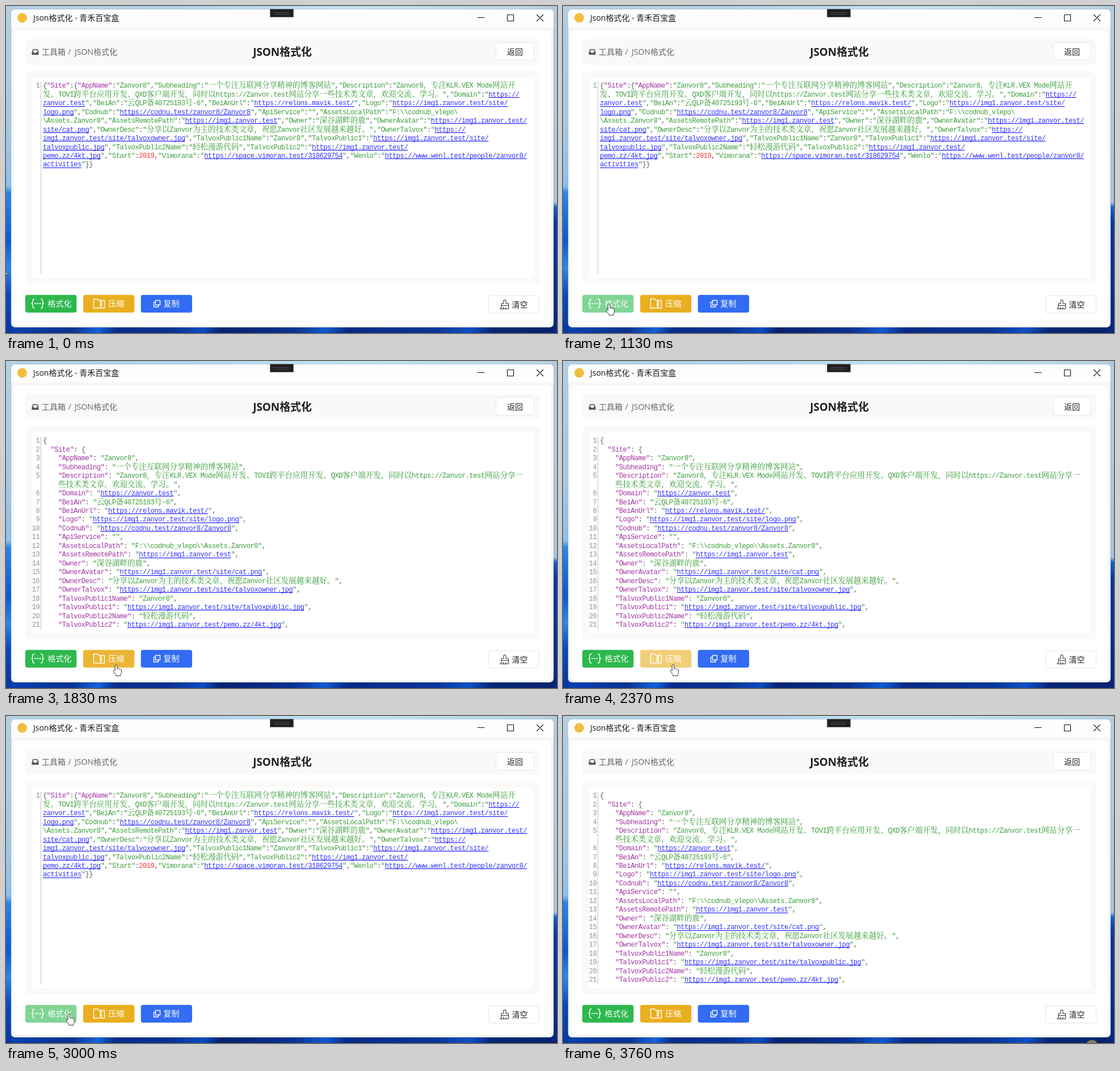
An HTML page that plays this animation: 971 px wide and 577 px high, repeating every 3870 ms.

```html
<!DOCTYPE html>
<html lang="zh-CN">
<head>
<meta charset="utf-8">
<title>Json格式化</title>
<style>
html, body { margin: 0; width: 100%; height: 100%; overflow: hidden; }
body {
  background:
    linear-gradient(#b4cfe2, #a5c8e2 38%, #8cc0ea 55%, #2a86ea 57%, #0d58d2 72%, #2f86ea 80%, #0a49c0 88%, #0a389c) 0 0 / 10px 577px no-repeat,
    linear-gradient(#b3cbdc, #a9c4da 60%, #1560d4 61.5%, #0a37a0 66%, #08267c) 963px 0 / 8px 577px no-repeat,
    linear-gradient(115deg, #0a43b4, #0a3190 12%, #1463da 17%, #092c88 20%, #0a3190 30%, #0c4cc0 36%, #08226e 39%, #0a3190 52%, #1258cf 58%, #092a84 62%, #0a3598 78%, #0f50c4 84%, #082674 88%, #08226e) 0 565px / 971px 12px no-repeat,
    linear-gradient(90deg, #b4cfe2, #b0d3e8 30%, #c2e2f2 62%, #b9d5e6 95%, #b3cbdc);
}
svg { display: block; }
text { white-space: pre; font: 14px 'Open Sans', 'Noto Sans CJK SC', sans-serif; }
.ascii { font: 12.2px 'Liberation Mono', monospace; fill-opacity: .8; }
.wide { font: 300 13.5px 'Noto Serif CJK SC', 'Noto Sans CJK SC', sans-serif; fill-opacity: .85; }
.line { fill: none; stroke-width: 1.4; stroke-linejoin: round; stroke-linecap: round; }
.btn { fill: #fff; }
.btn .line { stroke: #fff; }
</style>
</head>
<body>
<svg width="971" height="577" viewBox="0 0 971 577">
  <clipPath id="view"><rect x="46" y="126" width="883" height="348.5"/></clipPath>

  <!-- window -->
  <rect x="9" y="6" width="956" height="561" rx="7" fill="#f6f7f8" stroke="#7f93a8" stroke-opacity=".4"/>
  <path d="M9 38V13a7 7 0 0 1 7-7H958a7 7 0 0 1 7 7V38Z" fill="#fdfdfd"/>
  <rect x="14" y="43" width="946" height="520" rx="8" fill="#fff"/>
  <circle cx="28.5" cy="21" r="8.5" fill="#f4bd3c"/>
  <text x="48" y="26" fill="#1a1a1a">Json格式化 - 青禾百宝盒</text>
  <path class="line" style="stroke-width:1.1" stroke="#111" d="M831 20.5H843M883.5 15.5H894.5V26.5H883.5ZM935.5 15.5l11 11m0-11l-11 11"/>
  <rect x="465.5" y="5.5" width="41" height="14" fill="#202020" stroke="#6b6b6b"/>
  <path d="M472 11.5H500M472 14.5H500" stroke="#777" stroke-dasharray="1 1"/>

  <!-- header -->
  <rect x="34" y="58" width="906" height="45" rx="6" fill="#f9f9f8"/>
  <path d="M47.5 76H55.5L57.5 81.5V86H45.5V81.5ZM47.5 81.5H49.5L50.5 83H52.5L53.5 81.5H55.5L54.5 77.5H48.5Z" fill="#555" fill-rule="evenodd"/>
  <g fill="#666">
    <text x="63" y="86">工具箱</text><text x="109.5" y="86">/</text><text x="121" y="86">JSON格式化</text>
  </g>
  <text x="487" y="88" text-anchor="middle" fill="#1f1f1f" style="font-size:18.9px;font-weight:700">JSON格式化</text>
  <rect x="863.5" y="64.5" width="67" height="31" rx="4" fill="#fff" stroke="#e6e6e6"/>
  <text x="897" y="86" text-anchor="middle" fill="#212121">返回</text>

  <!-- editor -->
  <rect x="34" y="115" width="906" height="376" rx="8" fill="#f9f9f8"/>
  <rect x="46" y="126" width="883" height="354" fill="#fff"/>
  <path d="M61.5 134V474" stroke="#8a8a8a" stroke-dasharray="1 1"/>
  <g id="flat"></g>
  <g id="tree" clip-path="url(#view)"></g>

  <!-- buttons -->
  <g class="btn">
    <rect x="34" y="509.7" width="90.3" height="31.3" rx="4" fill="#2db84d"/>
    <path class="line" d="M50 517q-3 0-3 3v2.5q0 2.5-2 2.5q2 0 2 2.5v2.5q0 3 3 3M61.5 517q3 0 3 3v2.5q0 2.5 2 2.5q-2 0-2 2.5v2.5q0 3-3 3"/>
    <circle cx="51.5" cy="525" r="1.3"/><circle cx="55.7" cy="525" r="1.3"/><circle cx="60" cy="525" r="1.3"/>
    <text x="73.5" y="530">格式化</text>
  </g>
  <g class="btn">
    <rect x="136" y="509.7" width="90.3" height="31.3" rx="4" fill="#e9af20"/>
    <path class="line" d="M154.5 517H161.5L164 519.5H173.5V533H154.5ZM166 520v2h2.5v2.5H166v2.5h2.5v3H166v-3"/>
    <text x="180.5" y="530">压缩</text>
  </g>
  <g class="btn">
    <rect x="237.7" y="509.7" width="90.3" height="31.3" rx="4" fill="#326cf3"/>
    <path class="line" d="M263.5 519.5H271.5V527.5H263.5ZM263 522.5H260.5V531H268.5V528"/>
    <text x="277.5" y="530">复制</text>
  </g>
  <rect x="850.5" y="511" width="89" height="31" rx="4" fill="#fff" stroke="#e6e6e6"/>
  <path class="line" style="stroke-width:1.1" stroke="#333" d="M877 525V520.5q0-2 2-2t2 2V525H885.5V528.5H873V525ZM873.5 528.5Q873 533 871 534.5H885Q886.5 532 885.5 528.5M876 534.5l1-3M880.5 534.5l.5-3"/>
  <text x="891.5" y="532" fill="#212121">清空</text>

  <circle id="glow" cx="932" cy="582" r="10.5" fill="#e6d43a" fill-opacity=".55"/>
  <g id="cursor" fill="#fff" stroke="#222" stroke-width=".9" stroke-linejoin="round">
    <path id="arrow" d="M0 0V15.5L3.6 12.2 6 17.8 8.4 16.7 6 11.3H11Z"/>
    <path id="hand" d="M-1.8 1.6a1.8 1.8 0 0 1 3.6 0V7l1 .1a1.6 1.6 0 0 1 2.4.6a1.7 1.7 0 0 1 2.4.6a1.6 1.6 0 0 1 1.9 1.6V13.5q0 2-1.5 4V19.5H-.2V17.5q-2.5-2.5-4.5-6a1.5 1.5 0 0 1 2.5-1.5l.4.5z"/>
  </g>
</svg>
<script>
const $ = id => document.getElementById(id);
const LOOP = 3870, CELL = 6.77, ROW = 15.46, LEFT = 65, BASE = 144.3;
const KEY = '#8b008b', STR = '#0a870a', LINK = '#00f', NUM = '#f00', MARK = '#333', GUTTER = '#777';

// "|" wraps the compact view, "~" wraps the indented view
const site = 'https://img1.zanvor.test';
const data = {
  AppName: 'Zanvor8',
  Subheading: '一个专注互联网分享精神的博客网站',
  Description: 'Zanvor8，专注KLR.VEX Mode网站开|发、TOVI跨平台应用开发、QXD客户端开发，同时以https://Zanvor.test网站分享一~些技术类文章，欢迎交流、学习。',
  Domain: 'https://|zanvor.test',
  BeiAn: '云QLP备40725193号-6',
  BeiAnUrl: 'https://relons.mavik.test/',
  Logo: site + '/site/|logo.png',
  Codnub: 'https://codnu.test/zanvor8/Zanvor8',
  ApiService: '',
  AssetsLocalPath: 'F:\\\\codnub_vlepo\\|\\Assets.Zanvor8',
  AssetsRemotePath: site,
  Owner: '深谷湖畔的鹿',
  OwnerAvatar: site + '/|site/cat.png',
  OwnerDesc: '分享以Zanvor为主的技术类文章，祝愿Zanvor社区发展越来越好。',
  OwnerTalvox: 'https://|img1.zanvor.test/site/talvoxowner.jpg',
  TalvoxPublic1Name: 'Zanvor8',
  TalvoxPublic1: site + '/site/|talvoxpublic.jpg',
  TalvoxPublic2Name: '轻松漫游代码',
  TalvoxPublic2: site + '/|pemo.zz/4kt.jpg',
  Start: 2019,
  Vimorana: 'https://space.vimoran.test/318629754',
  Wenlo: 'https://www.wenl.test/people/zanvor8/|activities'
};

function add(parent, tag, attrs, content = '') {
  const el = document.createElementNS(parent.namespaceURI, tag);
  for (const name in attrs) el.setAttribute(name, attrs[name]);
  el.textContent = content;
  parent.append(el);
}

// Writes coloured text on a grid where wide characters take two cells
class Writer {
  constructor(parent) { Object.assign(this, { parent, col: 0, row: 0, indent: 0, count: 0 }); }
  put(str, fill = MARK) {
    for (const run of str.match(/\n|[ -~]+|[^\n -~]+/g) || []) {
      if (run === '\n') { this.row++; this.col = this.indent; continue; }
      const wide = run > '~', step = wide ? 2 : 1;
      const x = LEFT + this.col * CELL, y = BASE + this.row * ROW;
      const xs = [...run].map((_, i) => (x + i * step * CELL).toFixed(2));
      add(this.parent, 'text', { class: wide ? 'wide' : 'ascii', x: xs.join(' '), y, fill }, run);
      this.col += run.length * step;
      if (fill === LINK) add(this.parent, 'rect', { x, y: Math.round(y + 1.3), width: run.length * CELL, height: 1, fill });
    }
    return this;
  }
  number() {
    const { col } = this, label = String(++this.count);
    this.col = -0.85 - label.length;
    this.put(label, GUTTER).col = col;
    return this;
  }
  line(indent) {
    this.indent = indent;
    return this.put('\n').number();
  }
  value(v) {
    if (typeof v === 'number') return this.put(String(v), NUM);
    return this.put('"', STR).put(v, v.startsWith('https') ? LINK : STR).put('"', STR);
  }
}

const wrap = (v, on, off) => typeof v === 'string' ? v.replace(off, '').replace(on, '\n') : v;
const entries = Object.entries(data);

const flat = new Writer($('flat')).number().put('{').put('"Site"', KEY).put(':{');
const tree = new Writer($('tree')).number().put('{').line(2).put('"Site"', KEY).put(': {');
entries.forEach(([key, v], i) => {
  const name = `"${key}"`, comma = i < entries.length - 1 ? ',' : '';
  flat.put(name, i ? STR : KEY).put(':').value(wrap(v, '|', '~')).put(comma);
  tree.line(4).put(name, KEY).put(': ').value(wrap(v, '~', '|')).put(comma);
});
flat.put('}}');

// Pointer tip: time, x, y
const path = [
  [0, -7, 462], [70, -40, 480],
  [430, -6, 523], [510, 8, 524], [590, 24, 526], [670, 37, 528], [740, 47, 529], [820, 54, 529], [900, 62, 528],
  [980, 70, 527], [1050, 77, 526], [1130, 81, 526],
  [1460, 87, 526], [1530, 112, 528], [1600, 144, 531], [1680, 170, 533], [1750, 184, 535], [1830, 194, 536],
  [2450, 194, 535], [2530, 180, 533], [2600, 146, 529], [2680, 113, 526], [2920, 111, 526],
  [3160, 150, 529], [3250, 420, 545], [3340, 740, 557], [3430, 921, 561], [3460, 922, 569], [3530, 925, 590]
];
const between = (t, a, b) => t >= a && t < b;
const show = (el, on) => el.style.display = on ? '' : 'none';
const buttons = [...document.querySelectorAll('.btn')];

function draw(t) {
  const [, x, y] = path.findLast(p => p[0] <= t);
  const down = between(t, 1130, 1290) || between(t, 2310, 2380) || between(t, 2920, 3070);
  const indented = between(t, 1290, 2380) || t >= 3070;
  let over = false;
  buttons.forEach((button, i) => {
    const left = 34 + i * 102, hit = between(x, left, left + 90) && between(y, 510, 541);
    over ||= hit;
    button.style.opacity = hit ? (down ? 0.6 : 0.9) : 1;
  });
  show($('flat'), !indented);
  show($('tree'), indented);
  show($('glow'), t >= 3760);
  show($('hand'), over);
  show($('arrow'), !over);
  $('cursor').setAttribute('transform', `translate(${x} ${y})`);
}

const start = performance.now();
(function tick() {
  draw((performance.now() - start) % LOOP);
  requestAnimationFrame(tick);
})();
</script>
</body>
</html>
```
